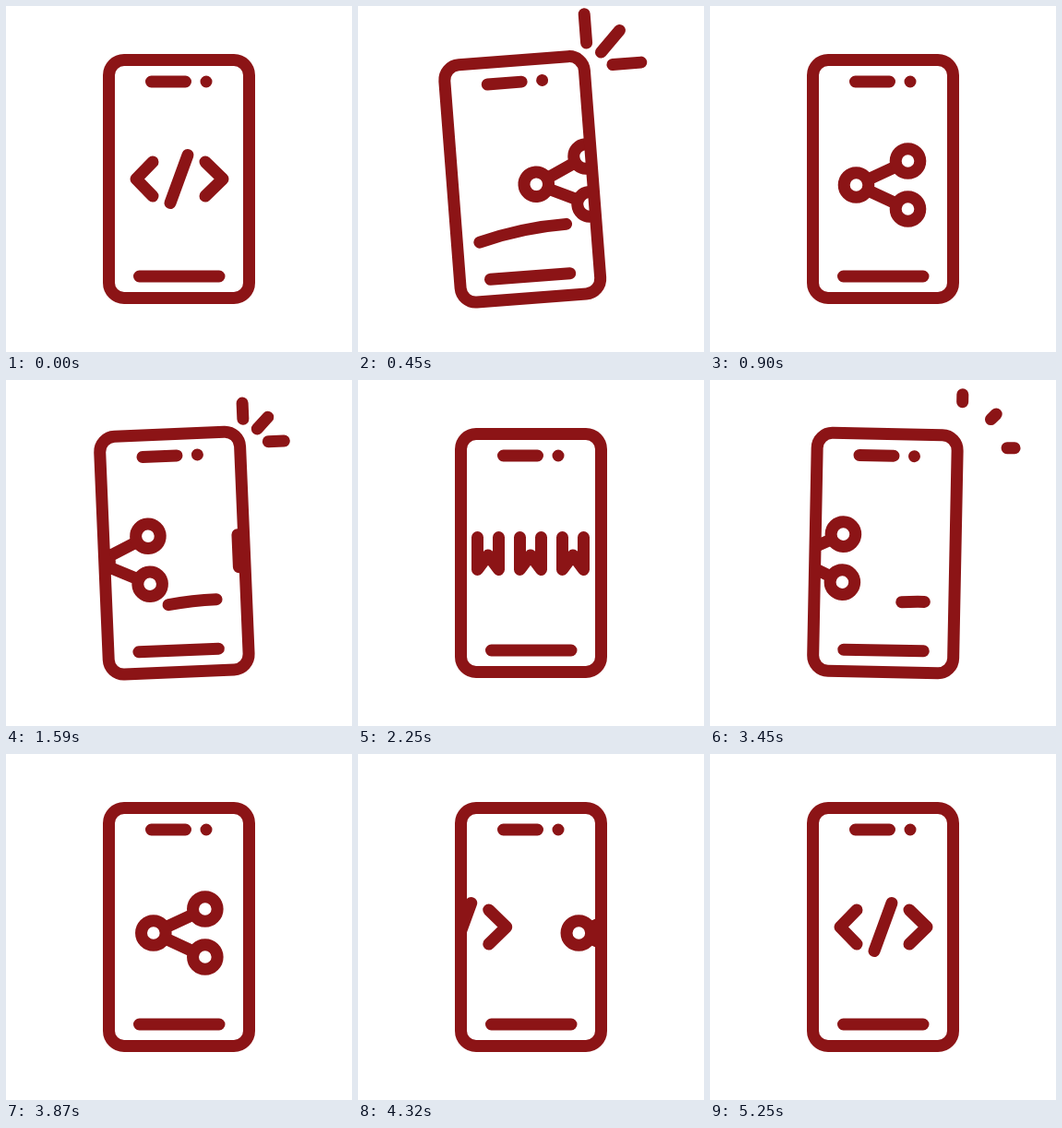
An HTML page with a canvas for the animation above (5.4 s loop, 375 px wide and 375 px high).

```html
<!DOCTYPE html>
<html lang="en">
<head>
<meta charset="utf-8">
<title>Phone swipe</title>
<style>
  html, body { margin: 0; height: 100%; overflow: hidden; background: #fff; }
  canvas { display: block; width: 375px; height: 375px; }
</style>
</head>
<body>
<canvas width="375" height="375"></canvas>
<script>
const ctx = document.querySelector('canvas').getContext('2d');
const RED = '#8c1416';
const LOOP = 5400, STEP = 30;
const SWIPES = [[0, -1], [45, -1], [90, 1]]; // start step, tilt direction
const SWIPE_LENGTH = 30, SLIDE_LENGTH = 22, GAP = 182, MAX_TILT = 4.4;

// Inner and outer end of each ray beside the phone
const RAYS = [[268, 45.5, 268, 14], [283, 56.7, 304.8, 34.6], [294.4, 71, 325.4, 71]];

const phone = new Path2D();
phone.roundRect(111.5, 58.5, 152, 258, 16.5);
const details = new Path2D('M157.5 82H194.5M217 82h.01M144.5 293H231');
const code = new Path2D('M159 169L141 187.5L159 206M197 161.5L178 213.5M216 169L235 187.5L216 206');
const links = new Path2D('M214.5 168L158.5 194L214.5 220');
const nodes = [[158.5, 194], [214.5, 168], [214.5, 220]];
const www = new Path2D([129.5, 175.5, 221.5].map(x =>
  `M${x} 170.5V205.5L${x + 11.5} 190L${x + 23} 205.5V170.5`).join(''));

const ease = t => {
  t = Math.min(1, Math.max(0, t));
  return t * t * (3 - 2 * t);
};

function at(x, draw) {
  ctx.save();
  ctx.translate(x, 0);
  draw();
  ctx.restore();
}

function drawShare() {
  ctx.stroke(links);
  for (const [x, y] of nodes) {
    ctx.beginPath();
    ctx.arc(x, y, 13.3, 0, 7);
    ctx.fill();
    ctx.stroke();
  }
}

function drawIcons(f) {
  const first = ease(f / SLIDE_LENGTH), second = ease((f - 45) / SLIDE_LENGTH);
  const back = f >= 90;
  const codeX = back ? -165 * (1 - ease((f - 120) / 45)) : -GAP * first;
  const shareX = back ? 5.3 * (f - 128.75) : GAP * (1 - first - second);
  const wwwX = GAP * (1 - second + ease((f - 90) / 30));
  ctx.save();
  ctx.clip(phone);
  at(codeX, () => ctx.stroke(code));
  at(shareX, drawShare);
  at(wwwX, () => ctx.stroke(www));
  ctx.restore();
}

// Strokes the finger trail between two fractions of its curve
function drawTrail(a, b) {
  const x = u => 231 - 95 * u, y = (u, v) => 239.5 + 12.5 * u * v;
  ctx.beginPath();
  ctx.moveTo(x(a), y(a, a));
  ctx.quadraticCurveTo(x((a + b) / 2), y(a, b), x(b), y(b, b));
  ctx.stroke();
}

function drawRays(a, b) {
  ctx.beginPath();
  for (const [x0, y0, x1, y1] of RAYS) {
    ctx.moveTo(x0 + (x1 - x0) * a, y0 + (y1 - y0) * a);
    ctx.lineTo(x0 + (x1 - x0) * b, y0 + (y1 - y0) * b);
  }
  ctx.stroke();
}

function render(f) {
  const [start, dir] = SWIPES.findLast(s => f >= s[0]);
  const p = (f - start) / SWIPE_LENGTH;
  const head = ease(2 * p), tail = ease(2 * p - 1);

  ctx.fillStyle = '#fff';
  ctx.strokeStyle = RED;
  ctx.lineWidth = 13;
  ctx.lineCap = ctx.lineJoin = 'round';
  ctx.fillRect(0, 0, 375, 375);

  ctx.save();
  ctx.translate(187.5, 308);
  ctx.rotate(dir * MAX_TILT * (head - tail) * Math.PI / 180);
  ctx.translate(-187.5, -308);
  drawIcons(f);
  ctx.stroke(phone);
  ctx.stroke(details);
  if (p > 0 && p < 1) {
    if (dir < 0) drawTrail(tail, head);
    else drawTrail(1 - head, 1 - tail);
    drawRays(tail, head);
  }
  ctx.restore();
}

function tick() {
  render(Math.floor(performance.now() % LOOP / STEP));
  requestAnimationFrame(tick);
}
tick();
</script>
</body>
</html>
```
